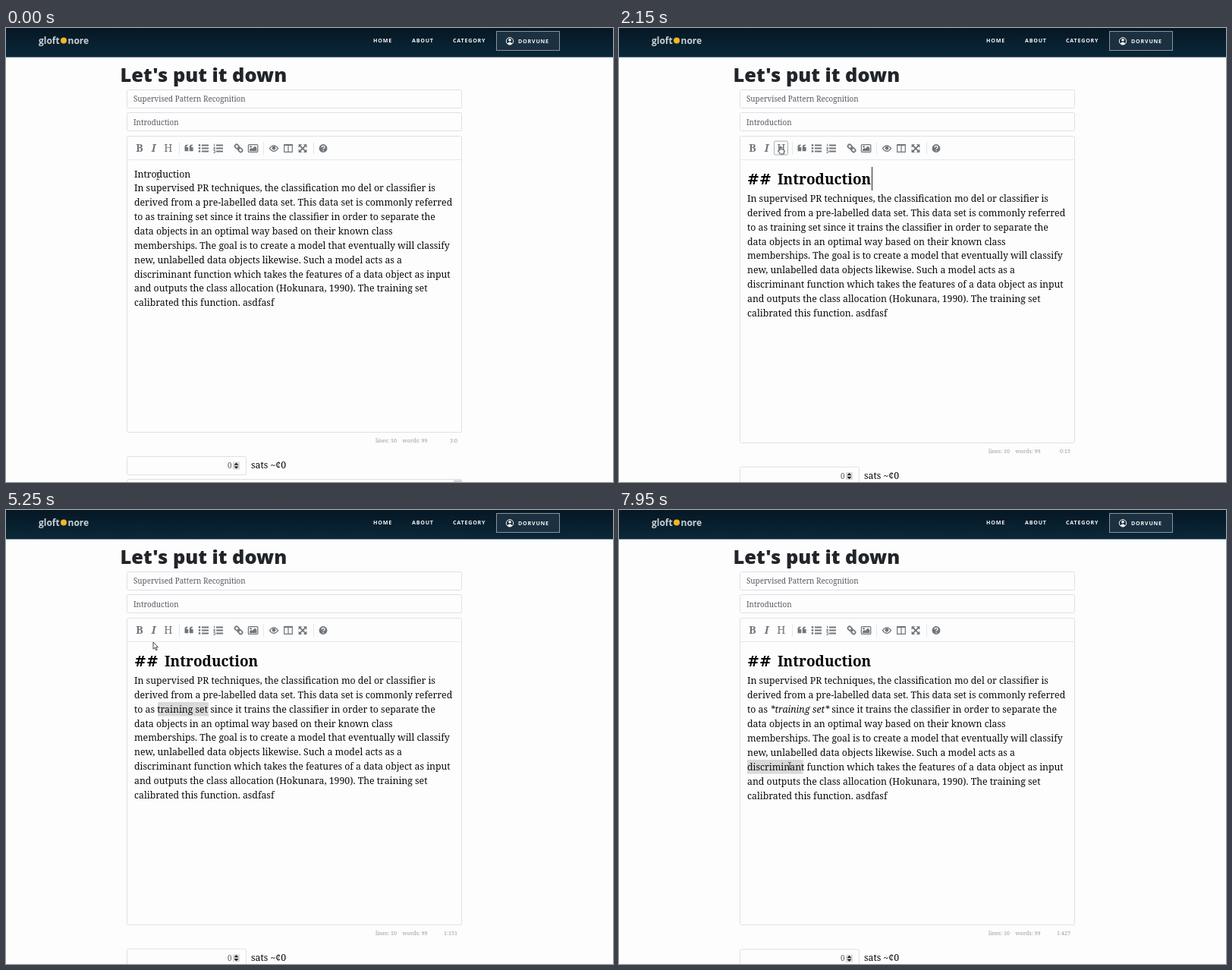
These frames come from a looping animation (800x598 px, 8000 ms). An HTML page:

```html
<!DOCTYPE html>
<html lang="en">
<head>
<meta charset="utf-8">
<title>Editor</title>
<style>
html, body { margin: 0; width: 100%; height: 100%; overflow: hidden; background: #fdfdfe; }
svg { display: block; width: 800px; height: 598px; }
text { white-space: pre; font-family: "Noto Serif", serif; }
.nav text { font: 700 7.1px "Open Sans", sans-serif; letter-spacing: .8px; fill: #f4f6f7; }
.nav .brand { font-size: 12px; letter-spacing: 0; fill: #c9d0d4; }
.title { font: 800 25.4px "Open Sans", sans-serif; fill: #212529; }
.field { fill: #fdfdfe; stroke: #dfe0e3; }
.small { font-size: 9.85px; fill: #555b61; }
.body { font-size: 12.29px; fill: #0c0c0c; }
.heading { font-weight: 700; fill: #050505; }
.heading .mark { font-family: "DejaVu Sans", sans-serif; }
.status { font-size: 7.1px; fill: #999; }
.glyph { font-size: 14px; fill: #70767c; text-anchor: middle; }
.icon { fill: none; stroke: #70767c; stroke-width: 1.4; }
.solid { fill: #70767c; stroke: none; }
.pointer { fill: #fff; stroke: #333; stroke-width: .9; stroke-linejoin: round; }
</style>
</head>
<body>
<svg viewBox="0 0 800 598">
  <defs>
    <linearGradient id="bar" x2="0" y2="1">
      <stop stop-color="#061724"/><stop offset="1" stop-color="#0a2839"/>
    </linearGradient>
  </defs>
  <g class="nav">
    <rect width="800" height="38.5" fill="url(#bar)"/>
    <text class="brand" x="43" y="21">gloft</text>
    <circle cx="76" cy="16.5" r="4" fill="#f3b61f"/>
    <text class="brand" x="81.5" y="21">nore</text>
    <text x="484" y="19.3">HOME</text>
    <text x="535" y="19.3">ABOUT</text>
    <text x="589" y="19.3">CATEGORY</text>
    <rect x="646.5" y="4.5" width="83" height="25" fill="#1b3040" stroke="#89959d"/>
    <circle cx="664" cy="17.3" r="4.7" fill="none" stroke="#fff"/>
    <circle cx="664" cy="15.8" r="1.8" fill="#fff"/>
    <path d="M660.7 20.5q3.3-4 6.6 0l-3.3 1.8z" fill="#fff"/>
    <text x="675" y="19.6">DORVUNE</text>
  </g>
  <text class="title" x="150.5" y="71">Let's put it down</text>
  <rect class="field" x="159.5" y="81.5" width="441" height="24" rx="2"/>
  <text class="small" x="168" y="97.4">Supervised Pattern Recognition</text>
  <rect class="field" x="159.5" y="111.5" width="441" height="24" rx="2"/>
  <text class="small" x="168" y="127.6">Introduction</text>

  <rect class="field" id="frame" x="159.5" y="142.5" width="441" height="390" rx="2"/>
  <path d="M160 173.5H600M228.5 150v17M339.5 150v17M405.5 150v17" stroke="#e6e7e9"/>
  <rect id="hover" y="149" width="18" height="18" rx="1.5" fill="#fbfbfc" stroke="#a9b1b6"/>
  <g class="glyph">
    <text x="176" y="163.3" font-weight="700">B</text>
    <text x="194.5" y="163.3" font-style="italic" font-weight="600">I</text>
    <text x="213.7" y="163.3" font-weight="500">H</text>
  </g>
  <g class="icon">
    <path class="solid" d="M235.5 158.5v-2q0-3 4-3v1.6q-2 0-1.7 1.9h2.5v5.3h-4.8zM241.8 158.5v-2q0-3 4-3v1.6q-2 0-1.7 1.9h2.5v5.3h-4.8z"/>
    <path d="M258 154.4h9M258 158.4h9M258 162.4h9" stroke-width="2"/>
    <path d="M255 154.4h.01M255 158.4h.01M255 162.4h.01" stroke-width="2.8" stroke-linecap="round"/>
    <path d="M277 154.4h9M277 158.4h9M277 162.4h9" stroke-width="2"/>
    <path d="M274.6 152.6v3M273.3 157.4h2.3l-2 2.2h2.2M273.3 161.3h2.2v3h-2.2" stroke-width="1"/>
    <g transform="rotate(45 306.5 158.5)" stroke-width="1.7">
      <rect x="300.4" y="156.2" width="6" height="4.4" rx="2"/>
      <rect x="306.6" y="156.2" width="6" height="4.4" rx="2"/>
      <path d="M304.5 158.4h4"/>
    </g>
    <rect x="319.4" y="153.6" width="12.4" height="9.8" rx="1" stroke-width="1.2"/>
    <path class="solid" d="M321 162v-2l2.3-2.3 1.3 1.3 3.4-3.4 2.4 2.4v4z"/>
    <circle class="solid" cx="322.6" cy="156.2" r="1.2"/>
    <path d="M347.4 158.6q5.6-7.4 11.2 0q-5.6 7.4-11.2 0z" stroke-width="1.2"/>
    <circle class="solid" cx="353" cy="158.2" r="2.4"/>
    <path d="M366.7 154h10.6v9.3h-10.6zM372 153v10.5" stroke-width="1.2"/>
    <path d="M366.2 154h11.6" stroke-width="2"/>
    <path d="M387 154.6l8 8M395 154.6l-8 8" stroke-width="1.8"/>
    <path class="solid" d="M385.6 153.2h4.6l-4.6 4.6zM396.4 153.2h-4.6l4.6 4.6zM385.6 164h4.6l-4.6-4.6zM396.4 164h-4.6l4.6-4.6z"/>
    <circle class="solid" cx="418" cy="158.5" r="5.4"/>
    <path d="M416.2 157.2q0-1.8 1.9-1.8t1.9 1.6q0 1-1.1 1.5t-.8 1.3M418.1 161v1.2" stroke="#fff" stroke-width="1.3"/>
  </g>

  <rect id="selection" height="18.5" fill="#d9d9d9"/>
  <g id="headings">
    <text class="body" x="169" y="196.5">Introduction</text>
    <g class="heading" font-size="23.8"><text class="mark" x="169" y="217">#</text><text x="197" y="217">Introduction</text></g>
    <g class="heading" font-size="19"><text class="mark" x="169" y="206">##</text><text x="209" y="206">Introduction</text></g>
  </g>
  <g class="body" id="upper"></g>
  <g class="body" id="lower"></g>
  <rect id="caret" width="1" fill="#222"/>

  <g id="footer">
    <text class="status" x="487" y="546">lines: 10</text>
    <text class="status" x="522.5" y="546">words: 99</text>
    <text class="status" id="position" x="595" y="546" text-anchor="end"></text>
    <rect class="field" x="159.5" y="564.5" width="157" height="24" rx="2"/>
    <text class="small" x="292" y="580">0</text>
    <rect x="299" y="571.5" width="9" height="10" fill="#dcdcdc"/>
    <path d="M300.5 575.7l3-3.2 3 3.2zM300.5 577.4l3 3.2 3-3.2z" fill="#222"/>
    <text class="body" x="323" y="580">sats ~¢0</text>
    <rect class="field" x="159.5" y="594.5" width="441" height="60" rx="2"/>
    <rect x="590" y="595.5" width="10.5" height="10" fill="#d3d4d7"/>
  </g>

  <g class="pointer" id="pointer">
    <path d="M-2-4.6Q0-4.6 0-3.6Q0-4.6 2-4.6M0-3.6V4M-2 5Q0 5 0 4Q0 5 2 5" fill="none"/>
    <path d="M0 0V9.2L2.2 7.2 3.8 10.8 5.3 10.1 3.7 6.7H6.4Z"/>
    <path d="M-.8 1V-3.4Q0-4.6 .9-3.4V-.4L4 .3Q5 .7 4.8 2L4.2 6H-.6L-3 2.4Q-3.2 1-2 1.2Z"/>
  </g>
</svg>
<script>
const LOOP = 8000;
const $ = id => document.getElementById(id);
const lines = [
  'In supervised PR techniques, the classification mo del or classifier is',
  'derived from a pre-labelled data set. This data set is commonly referred',
  'to as <tspan id="term">training set</tspan> since it trains the classifier in order to separate the',
  'data objects in an optimal way based on their known class',
  'memberships. The goal is to create a model that eventually will classify',
  'new, unlabelled data objects likewise. Such a model acts as a',
  'discriminant function which takes the features of a data object as input',
  'and outputs the class allocation (Hokunara, 1990). The training set',
  'calibrated this function. asdfasf'
].map((line, i) => `<text x="169" y="${215.4 + i * 18.87}">${line}</text>`);
$('upper').innerHTML = lines.slice(0, 3).join('');
$('lower').innerHTML = lines.slice(3).join('');

// Keys: [time, ...values]
const path = [
  [0, 200, 195], [1050, 200, 195], [1400, 213, 160], [2500, 213, 160], [2900, 307, 319],
  [3150, 307, 319], [3350, 278, 278], [3550, 267, 262], [3750, 267, 262], [4350, 200, 262],
  [4500, 200, 262], [4800, 196, 263], [4950, 196, 263], [5250, 194, 174], [5400, 194, 160],
  [5950, 194, 160], [6550, 246, 317], [6650, 249, 321], [6800, 249, 321], [7100, 255, 336],
  [7600, 255, 336], [7700, 225, 337], [LOOP, 225, 337]
];
const carets = [
  [0, 0, 0, 0], [100, 169, 391, 18], [900, 200, 183, 18], [1600, 324.5, 183, 49],
  [1750, 352, 183, 49], [1950, 333, 183, 31], [2950, 306.5, 311, 16],
  [3750, 0, 0, 0], [7350, 255, 330, 16], [7900, 0, 0, 0]
];
const counts = [
  [0, '3:0'], [900, '0:5'], [1600, '0:14'], [1950, '0:15'], [2950, '1:162'],
  [5950, '1:164'], [7350, '1:429'], [7900, '1:427']
];
const levels = [[0, 0], [1600, 1], [1950, 2]];
const hovers = [[0, 0], [1350, 204.5], [2550, 0], [5400, 185.5], [7350, 0]];
const shifts = [0, 31.5, 13.6];

const current = (keys, t) => keys.findLast(key => key[0] <= t);
const set = (el, attrs) => { for (const name in attrs) el.setAttribute(name, attrs[name]); };
const moveY = (id, y) => set($(id), { transform: `translate(0 ${y})` });
const showOnly = (group, index) =>
  [...group.children].forEach((el, i) => { el.style.display = i === index ? '' : 'none'; });

function pointerAt(t) {
  const i = path.findIndex(key => key[0] > t);
  const [t0, x0, y0] = path[i - 1], [t1, x1, y1] = path[i];
  const k = (t - t0) / (t1 - t0);
  return [x0 + (x1 - x0) * k, y0 + (y1 - y0) * k];
}

const isDragged = t => t >= 3750 && t < 5950;

function selectionAt(t, x) {
  if (isDragged(t)) return [t < 4350 ? Math.min(267, x) : 200, 267, 253];
  if (t >= 5950 && t < 7350) return [207, 273, 253];
  if (t >= 7900) return [169, 242.5, 329];
  return [0, 0, 0];
}

function draw(time) {
  const t = Math.floor(time / 50) * 50;
  const [x, y] = pointerAt(t);
  const level = current(levels, t)[1];
  const italic = t >= 5950;
  const shift = shifts[level], lower = shift + (italic ? .6 : 0);

  showOnly($('headings'), level);
  moveY('upper', shift);
  moveY('lower', lower);
  moveY('footer', lower);
  set($('frame'), { height: 390 + Math.round(lower) });
  set($('term'), { 'font-style': italic ? 'italic' : 'normal' });
  $('term').textContent = italic ? '*training set*' : 'training set';

  const [left, right, top] = selectionAt(t, x);
  set($('selection'), { x: left, y: top, width: right - left });
  $('position').textContent = isDragged(t)
    ? '1:' + Math.round(151 + (left - 200) / 67 * 12) : current(counts, t)[1];

  const [since, cx, cy, height] = current(carets, t);
  const lit = (t - since) % 1060 < 500;
  set($('caret'), { x: cx, y: cy, height: lit ? height : 0 });

  const hover = current(hovers, t)[1];
  set($('hover'), { x: hover, visibility: hover ? 'visible' : 'hidden' });
  showOnly($('pointer'), y < 165 ? 2 : y < 182 ? 1 : 0);
  set($('pointer'), { transform: `translate(${x} ${y})` });
}

const start = performance.now();
function tick() {
  draw((performance.now() - start) % LOOP);
  requestAnimationFrame(tick);
}
tick();
</script>
</body>
</html>
```
